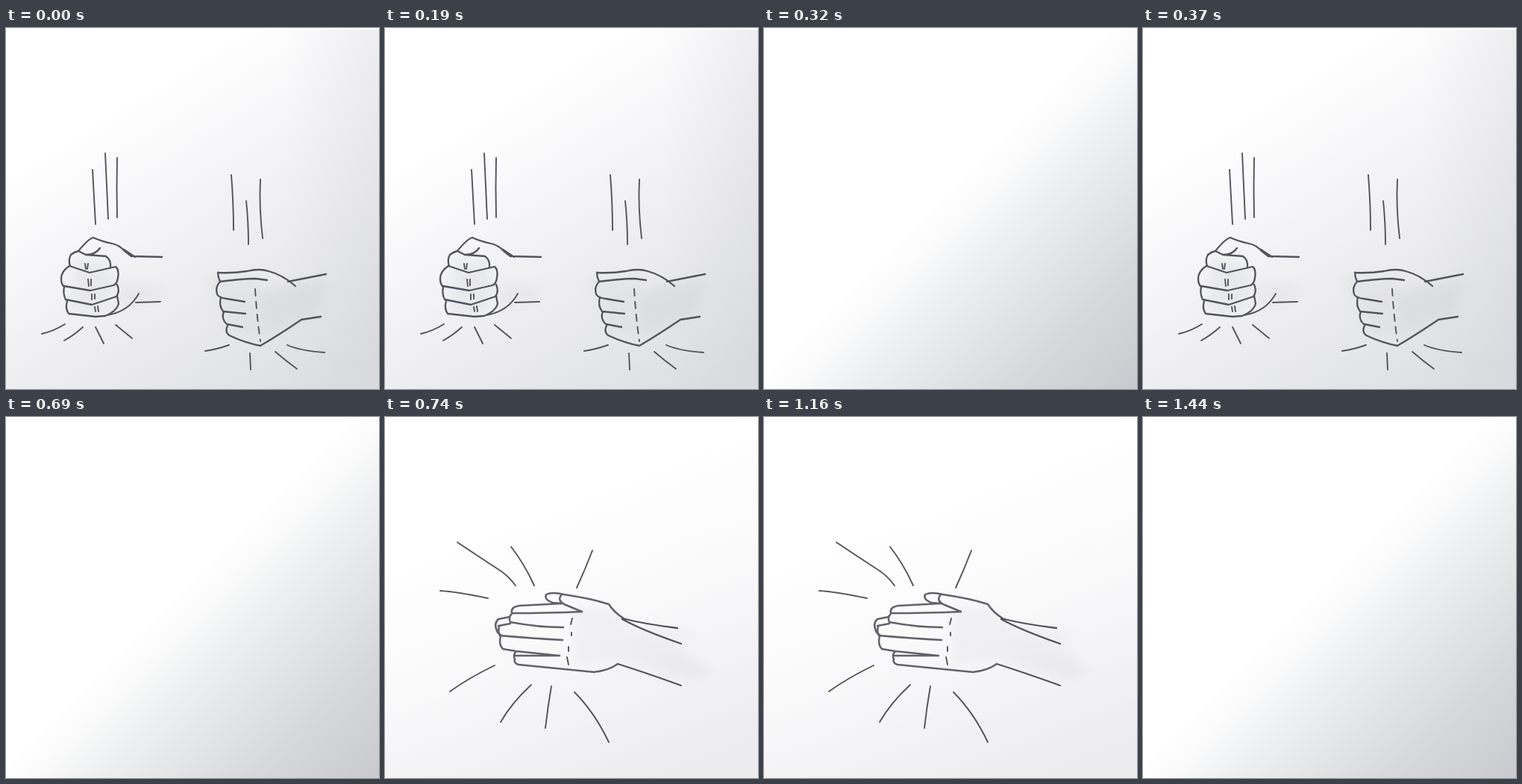
An HTML page that plays this animation: 500 px wide and 484 px high, repeating every 1480 ms.

```html
<!DOCTYPE html>
<html lang="en">
<head>
<meta charset="utf-8">
<title>Fists and clap</title>
<style>
  html, body { margin: 0; width: 100%; height: 100%; overflow: hidden; background: #fff; }
  svg { display: block; width: 100%; height: 100%; }
  .ink { fill: none; stroke: #53535b; stroke-width: 2.3; stroke-linecap: round; stroke-linejoin: round; }
  .thin { stroke-width: 1.9; }
  .bold { stroke: #62626a; stroke-width: 2.5; }
  .smudge { filter: url(#soft); }
</style>
</head>
<body>
<svg viewBox="0 0 500 484" preserveAspectRatio="none">
  <defs>
    <linearGradient id="blankFill" gradientUnits="userSpaceOnUse" x1="0" y1="0" x2="492" y2="492">
      <stop offset=".47" stop-color="#fff"/>
      <stop offset=".53" stop-color="#fafafa"/>
      <stop offset=".6" stop-color="#eff1f3"/>
      <stop offset=".7" stop-color="#e5e6e8"/>
      <stop offset=".84" stop-color="#d6d7da"/>
      <stop offset="1" stop-color="#c9cacf"/>
    </linearGradient>
    <linearGradient id="fistPaper" gradientUnits="userSpaceOnUse" x1="90" y1="0" x2="400" y2="500">
      <stop offset=".2" stop-color="#fff"/>
      <stop offset=".42" stop-color="#f6f6f8"/>
      <stop offset=".65" stop-color="#ededf0"/>
      <stop offset="1" stop-color="#dddee2"/>
    </linearGradient>
    <linearGradient id="edge">
      <stop offset=".75" stop-color="#c8c9d0" stop-opacity="0"/>
      <stop offset="1" stop-color="#c8c9d0" stop-opacity=".22"/>
    </linearGradient>
    <linearGradient id="clapPaper" gradientUnits="userSpaceOnUse" x1="130" y1="0" x2="330" y2="500">
      <stop offset=".25" stop-color="#fff"/>
      <stop offset=".55" stop-color="#fafafb"/>
      <stop offset="1" stop-color="#ececef"/>
    </linearGradient>
    <filter id="soft" x="-40%" y="-40%" width="180%" height="180%">
      <feGaussianBlur stdDeviation="7"/>
    </filter>
  </defs>

  <g id="fists">
    <path fill="url(#fistPaper)" d="M0 0H500V484H0Z"/>
    <path fill="url(#edge)" d="M0 0H500V484H0Z"/>
    <g class="smudge" fill="#d6d7dc" opacity=".6">
      <path d="M150 340L205 345L206 364L155 378Z" opacity=".4"/>
      <path d="M340 355L385 345L430 340L418 383L345 412Z"/>
      <path d="M270 335L340 335L340 415L300 405Z" opacity=".5"/>
      <path d="M90 310L135 312L146 345L125 382L88 378Z" opacity=".5"/>
    </g>
    <g class="ink">
      <path class="thin" d="M116 190Q118 225 120 263M133 168Q135 210 137 256M149 174Q148 215 149 254"/>
      <path d="M87 304Q92 300 97 299Q110 283 117 281Q128 286 142 289Q152 291 159 299L168 306L209 307M158 297L173 307"/>
      <path d="M97 299L107 304Q120 304 126 295M107 304L134 306Q141 311 140 321M87 304Q83 311 86 319"/>
      <path d="M85 319Q74 326 74 336Q74 344 78 347M85 319L112 328L147 320Q152 324 150 335Q149 343 144 345L113 352L78 346"/>
      <path d="M78 347Q76 356 80 364L115 371L148 360Q153 353 149 344M82 366Q79 376 84 383L120 387L133 386Q148 380 151 370L149 359"/>
      <path class="thin" d="M136 385Q165 380 178 356M174 368L207 367"/>
      <path class="thin" d="M106 316L107 323M110 316L109 323M110 337L111 346M114 337L114 345M115 357L115 364M119 357L119 363M119 374L120 380M123 373L124 380"/>
      <path class="thin" d="M48 410Q65 406 79 397M78 419Q91 412 103 401M120 401L131 423M147 398L169 416"/>

      <path class="thin" d="M302 197Q305 235 305 271M322 232Q325 260 325 290M341 203Q339 240 344 282"/>
      <path d="M284 328Q304 329 323 326Q340 322 352 326Q371 331 388 346M378 340L429 330"/>
      <path d="M284 328Q284 334 287 340Q320 336 334 336L350 338"/>
      <path d="M287 340Q280 347 283 357Q286 362 296 363L320 367M288 361Q285 372 291 380L321 383"/>
      <path d="M292 380Q288 390 296 397L317 401M297 399Q293 407 299 412Q320 422 341 426Q365 412 396 391L422 387"/>
      <path class="thin" stroke-dasharray="9 8" d="M334 350Q336 385 341 420"/>
      <path class="thin" d="M267 433Q282 431 299 425M327 436L328 458M361 434Q376 447 390 457M377 425Q395 433 427 435"/>
    </g>
  </g>

  <g id="clap">
    <path fill="url(#clapPaper)" d="M0 0H500V484H0Z"/>
    <g class="smudge" fill="#e2e2e6" opacity=".5">
      <path d="M250 250L300 255L330 280L395 305L415 330L385 350L312 326L255 332Z" opacity=".7"/>
      <path d="M330 305L410 320L440 345L400 352Z"/>
      <path d="M340 278L420 292L405 302L360 292Z" opacity=".7"/>
    </g>
    <g class="ink">
      <path class="thin" d="M97 168Q130 190 150 203Q165 212 175 226M169 174Q187 197 200 226M278 179Q268 205 257 229M74 233Q95 234 138 243"/>
      <path class="thin" d="M87 368Q112 350 147 333M155 409Q170 383 196 359M223 361Q218 390 215 417M254 369Q281 396 300 436"/>
      <path class="bold" d="M237 250L225 249Q213 245 216 238Q224 234 240 238Q275 243 300 251Q307 262 320 270M236 239Q231 246 240 251Q252 256 264 261"/>
      <path class="bold" d="M237 250L180 253Q168 255 170 263Q215 263 264 261M170 264Q165 268 168 275Q205 282 239 282"/>
      <path class="bold" d="M167 268L152 271Q145 277 151 289L155 292M168 277L152 280M153 281Q151 288 154 293Q200 297 238 299"/>
      <path class="bold" d="M155 294Q152 305 158 311L176 314Q205 317 234 320M176 314Q171 319 174 325M234 320L174 320"/>
      <path class="bold" d="M174 324Q172 330 179 332Q230 337 280 342Q300 340 312 331"/>
      <path d="M318 271Q345 286 397 304M318 270Q350 278 392 283"/>
      <path class="thin" d="M312 331Q350 343 397 360"/>
      <path class="thin" d="M251 270L249 278M250 289L250 293M246 308L246 314M244 322L246 332"/>
    </g>
  </g>

  <path id="blank" fill="url(#blankFill)" d="M0 0H500V484H0Z"/>
  <path fill="#fff" d="M0 0H500V2H0Z"/>
</svg>
<script>
  const LOOP = 1480;
  // [end time in ms, visible scene]
  const cues = [[320, 'fists'], [370, 'blank'], [690, 'fists'], [740, 'blank'], [1440, 'clap'], [LOOP, 'blank']];
  const scenes = ['fists', 'clap', 'blank'].map(id => document.getElementById(id));
  const start = performance.now();

  function draw(now) {
    const t = Math.max(0, now - start) % LOOP;
    const shown = cues.find(([end]) => t < end)[1];
    for (const scene of scenes) scene.style.display = scene.id === shown ? '' : 'none';
    requestAnimationFrame(draw);
  }
  draw(start);
</script>
</body>
</html>
```
